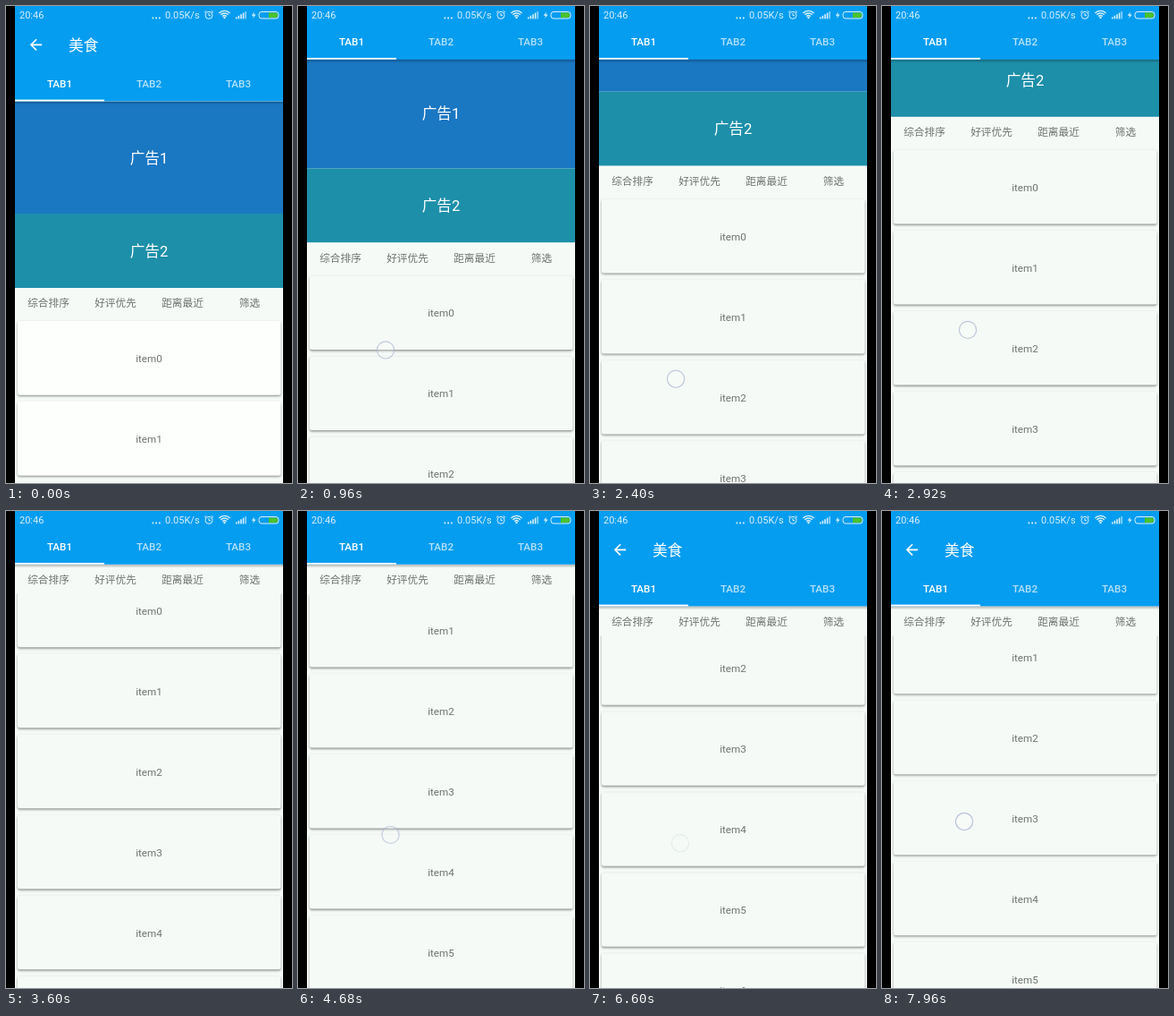
Animation, 320 px wide and 533 px high, one loop 8 s. Source, as an HTML page with a canvas:

```html
<!DOCTYPE html>
<html lang="zh">
<head>
<meta charset="utf-8">
<style>
html, body { margin: 0; width: 100%; height: 100%; overflow: hidden; background: #000; }
canvas { display: block; }
</style>
</head>
<body>
<canvas id="stage" width="320" height="533"></canvas>
<script>
const ctx = document.getElementById('stage').getContext('2d');
const DURATION = 8000;
const FONT = 'Roboto, "Noto Sans CJK SC", "Noto Sans CJK", sans-serif';
const PAGE = '#f5faf6', HEADER = '#059df0', GREY = '#707471';
const TOOLBAR = 46.7, HEADER_BOTTOM = 106.4, FILTER_HEIGHT = 33;

// time in ms, distance the content has moved up
const scrollKeys = [
  [0, 0], [600, 0], [800, 20], [1100, 76], [1560, 119], [2080, 133], [2280, 133],
  [2920, 191], [3300, 250], [3920, 300], [4280, 300], [4680, 350], [5100, 447],
  [5640, 529], [5960, 538], [6250, 474], [6600, 398], [7000, 346], [7720, 320.5], [8000, 320.5]
];
const TURN_TIME = 5960, TURN_SCROLL = 538;

// start, end, x, y at zero scroll, opacity
const touches = [
  [600, 1200, 98, 435, 0.7],
  [2260, 3300, 96, 553, 0.7],
  [4260, 5000, 103.5, 712, 0.6],
  [5960, 6640, 101, 769, 0.5],
  [7880, 8100, 92, 667.5, 0.8]
];

const clamp = (v, lo, hi) => Math.min(hi, Math.max(lo, v));

function slope(i) {
  const a = scrollKeys[i - 1], b = scrollKeys[i], c = scrollKeys[i + 1];
  if (!a || !c) return 0;
  const before = (b[1] - a[1]) / (b[0] - a[0]), after = (c[1] - b[1]) / (c[0] - b[0]);
  return before * after <= 0 ? 0 : 2 * before * after / (before + after);
}

// Monotone cubic interpolation
function scrollAt(t) {
  let i = 0;
  while (i < scrollKeys.length - 2 && t >= scrollKeys[i + 1][0]) i++;
  const [t0, s0] = scrollKeys[i], [t1, s1] = scrollKeys[i + 1];
  const span = t1 - t0, u = (t - t0) / span, v = 1 - u;
  return s0 * (1 + 2 * u) * v * v + s1 * u * u * (3 - 2 * u)
    + span * u * v * (slope(i) * v - slope(i + 1) * u);
}

function text(str, x, y, size, color, align = 'center', weight = 400) {
  ctx.font = `${weight} ${size}px ${FONT}`;
  ctx.textAlign = align;
  ctx.fillStyle = color;
  ctx.fillText(str, x, y);
}

function rect(x, y, w, h, color) {
  ctx.fillStyle = color;
  ctx.fillRect(x, y, w, h);
}

function rounded(x, y, w, h, r) {
  ctx.beginPath();
  ctx.roundRect(x, y, w, h, r);
}

function arc(x, y, r, from = 0, to = 2 * Math.PI) {
  ctx.beginPath();
  ctx.arc(x, y, r, from, to);
}

function card(index, y, color) {
  ctx.save();
  ctx.shadowColor = 'rgba(0,0,0,.42)';
  ctx.shadowBlur = 2.5;
  ctx.shadowOffsetY = 1.4;
  ctx.fillStyle = color;
  rounded(13, y - 42, 294.5, 82.7, 2.5);
  ctx.fill();
  ctx.restore();
  text('item' + index, 160, y + 4, 11.67, GREY);
}

function filterBar(y) {
  rect(10, y, 300, FILTER_HEIGHT, PAGE);
  ['综合排序', '好评优先', '距离最近', '筛选'].forEach((label, i) =>
    text(label, 47.5 + 75 * i, y + 21.2, 11.67, GREY));
}

function content(scroll, headerBottom, cardColor) {
  rect(10, 0, 300, 533, PAGE);
  for (let i = 0; i < 13; i++) {
    const y = 394 + 90 * i - scroll;
    if (y > -45 && y < 580) card(i, y, cardColor);
  }
  const top = 106.7 - scroll;
  rect(10, top, 300, 125.3, '#1a77c2');
  rect(10, top + 125.3, 300, 83, '#1d8fa9');
  text('广告1', 160, top + 69.5, 16.67, '#fff');
  text('广告2', 160, top + 173, 16.67, '#fff');
  filterBar(Math.max(315 - scroll, headerBottom));
}

const arrow = new Path2D('M20 11H7.83l5.59-5.59L12 4l-8 8 8 8 1.41-1.41L7.83 13H20z');

function header(hidden, bottom) {
  const shadow = ctx.createLinearGradient(0, bottom, 0, bottom + 4);
  shadow.addColorStop(0, 'rgba(0,0,0,.28)');
  shadow.addColorStop(1, 'rgba(0,0,0,0)');
  rect(10, bottom, 300, 4, shadow);
  rect(10, 0, 300, bottom, HEADER);

  ctx.save();
  ctx.translate(23.5, 33.3 - hidden);
  ctx.scale(0.833, 0.833);
  ctx.fillStyle = '#fff';
  ctx.fill(arrow);
  ctx.restore();
  text('美食', 70, 50.3 - hidden, 16.67, '#fff', 'left', 500);

  for (let i = 0; i < 3; i++)
    text('TAB' + (i + 1), 60 + 100 * i, bottom - 15.3, 11.67,
      i ? 'rgba(255,255,255,.7)' : '#fff', 'center', 500);
  rect(10, bottom - 1.8, 100, 1.8, '#fff');
}

function statusBar() {
  const white = 'rgba(255,255,255,.85)';
  rect(10, 0, 300, 20, HEADER);
  text('20:46', 15, 14.3, 11, white, 'left');
  text('0.05K/s', 178, 14.3, 11, white, 'left');
  ctx.strokeStyle = white;
  ctx.lineWidth = 1;

  for (let i = 0; i < 3; i++) rect(163.5 + 3.7 * i, 12.5, 1.8, 1.8, white);

  // Alarm clock
  arc(227, 10.3, 4);
  ctx.moveTo(227, 8);
  ctx.lineTo(227, 10.7);
  ctx.lineTo(229, 10.7);
  ctx.moveTo(222, 7.3);
  ctx.lineTo(224.3, 5.3);
  ctx.moveTo(229.7, 5.3);
  ctx.lineTo(232, 7.3);
  ctx.stroke();

  // Wi-Fi
  ctx.lineWidth = 1.4;
  for (const r of [3.2, 5.8, 8.4]) {
    arc(244.5, 13.8, r, -Math.PI * 0.76, -Math.PI * 0.24);
    ctx.stroke();
  }
  arc(244.5, 13, 1.2);
  ctx.fill();

  for (let i = 0; i < 5; i++) {
    const h = 2 + 1.6 * i;
    rect(257 + 2.6 * i, 14.4 - h, 1.6, h, i < 4 ? white : 'rgba(255,255,255,.55)');
  }

  ctx.fillStyle = white;
  ctx.fill(new Path2D('M277.8 6.5L274.8 10.8H277L276.2 14L279.6 9.4H277.3z'));

  // Battery
  ctx.lineWidth = 1;
  rounded(283, 6.5, 22, 7.5, 3);
  ctx.stroke();
  ctx.fillStyle = '#4cc22c';
  rounded(294, 7.5, 10, 5.5, [0, 2, 2, 0]);
  ctx.fill();
}

function touchMarker(t, scroll) {
  for (const [start, end, x, y, opacity] of touches) {
    if (t < start || t > end) continue;
    ctx.save();
    ctx.globalAlpha = opacity * clamp((end - t) / 100, 0, 1);
    arc(x, y - scroll, 9.6);
    ctx.fillStyle = 'rgba(255,255,255,.25)';
    ctx.fill();
    ctx.strokeStyle = '#a9b2d2';
    ctx.lineWidth = 1.2;
    ctx.stroke();
    ctx.restore();
  }
}

function draw(t) {
  const scroll = scrollAt(t);
  const shownFrom = t < TURN_TIME ? 0 : TURN_SCROLL - TOOLBAR;
  const hidden = clamp(scroll - shownFrom, 0, TOOLBAR);
  const bottom = HEADER_BOTTOM - hidden;

  rect(0, 0, 320, 533, '#000');
  ctx.save();
  ctx.beginPath();
  ctx.rect(10, 0, 300, 533);
  ctx.clip();
  content(scroll, bottom, t < 600 ? '#fdfffc' : PAGE);
  header(hidden, bottom);
  statusBar();
  touchMarker(t, scroll);
  ctx.restore();
}

function tick() {
  draw(performance.now() % DURATION);
  requestAnimationFrame(tick);
}
tick();
</script>
</body>
</html>
```
